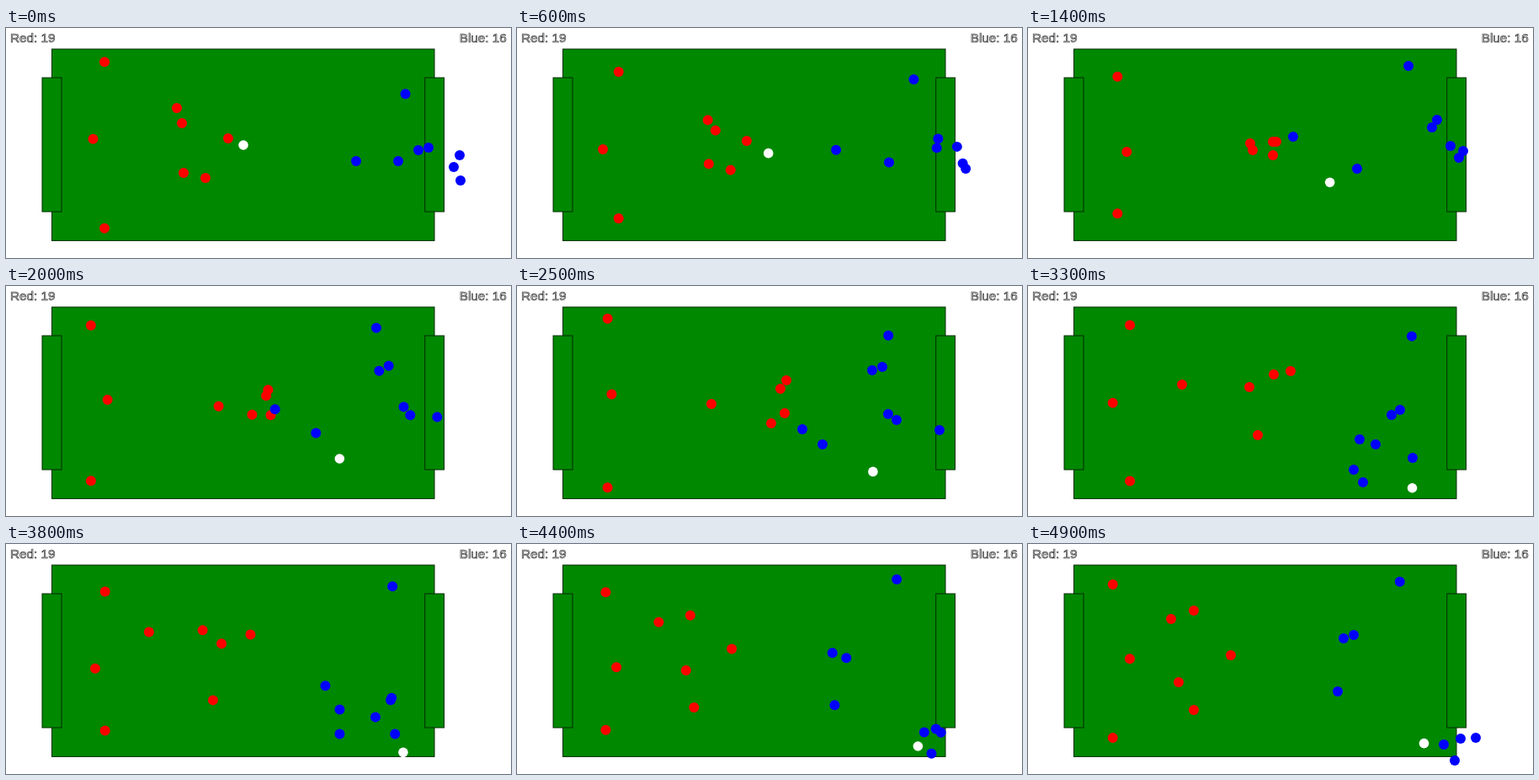
Write an HTML page that moves like this. It is 600x273 px and loops after 5000 ms.

```html
<!DOCTYPE html>
<html lang="en">
<head>
<meta charset="utf-8">
<title>Red and blue football</title>
<style>
  html, body { margin: 0; width: 100%; height: 100%; overflow: hidden; background: #fff; }
  svg { display: block; width: 100%; height: 100%; }
  rect { fill: #080; stroke: #022b02; stroke-width: 1; }
  text {
    font: 15.3px "Liberation Sans", Arial, sans-serif;
    fill: #ddd; stroke: #3a3a3a; stroke-width: .7;
  }
</style>
</head>
<body>
<svg viewBox="0 0 600 273">
  <rect x="54.5" y="25" width="454.5" height="227.4"/>
  <rect x="43" y="59" width="23" height="159"/>
  <rect x="497.7" y="59" width="22.8" height="159"/>
  <text x="5" y="17.3">Red: 19</text>
  <text x="538.7" y="17.3">Blue: 16</text>
  <g id="dots"></g>
</svg>
<script>
const LOOP = 5000, STEP = 100;
const BEATS = [0, 1.4, 2.5, 3.3, 4.9];
const RED = '#f00', BLUE = '#00f', WHITE = '#fff';
const layer = document.getElementById('dots');
const movers = [];

function addDot(color, place, r = 6) {
  const el = document.createElementNS('http://www.w3.org/2000/svg', 'circle');
  el.setAttribute('r', r);
  el.setAttribute('fill', color);
  layer.append(el);
  movers.push({ el, place });
}

// Smooth curve through one value per beat, at rest at both ends.
function curve(v) {
  const last = BEATS.length - 1;
  const span = i => BEATS[i + 1] - BEATS[i];
  const rate = i => (v[i + 1] - v[i]) / span(i);
  const slope = i => {
    if (i === 0 || i === last) return 0;
    const a = span(i - 1), b = span(i);
    return (rate(i - 1) * b + rate(i) * a) / (a + b);
  };
  return t => {
    let i = 0;
    while (i < last - 1 && t >= BEATS[i + 1]) i++;
    const h = span(i), u = (t - BEATS[i]) / h, w = 1 - u;
    return w * w * ((1 + 2 * u) * v[i] + u * h * slope(i))
         + u * u * ((1 + 2 * w) * v[i + 1] - w * h * slope(i + 1));
  };
}

function addRunner(color, ...points) {
  const x = curve(points.map(p => p[0])), y = curve(points.map(p => p[1]));
  addDot(color, t => [x(t), y(t)]);
}

function orbit(cx, cy, degrees) {
  const a = degrees * Math.PI / 180;
  return [cx + 10.3 * Math.cos(a), cy + 10.3 * Math.sin(a)];
}

// Red guards circle their posts, each mirroring the first.
const turn = t => 122 * t - 54;
addDot(RED, t => orbit(111, 48.6, turn(t)));
addDot(RED, t => orbit(111, 229.4, -turn(t)));
addDot(RED, t => orbit(111, 138.8, 169 - turn(t)));

// The blue guard spirals in to its post.
addDot(BLUE, t => {
  const away = Math.max(0, 1 - t / 2.5) ** 2;
  return orbit(449 + 21 * away, 52 + 17 * away, 424 - 114 * t);
});

addRunner(RED, [203, 95], [264, 137], [231, 140], [183, 117], [170, 89]);
addRunner(RED, [209, 113], [291, 135], [313, 122], [292, 105], [179, 164]);
addRunner(RED, [264, 131], [295, 135], [320, 112], [312, 101], [241, 132]);
addRunner(RED, [211, 172], [267, 145], [302, 163], [273, 177], [197, 197]);
addRunner(RED, [237, 178], [291, 151], [318, 151], [263, 120], [197, 79]);

addRunner(BLUE, [416, 158], [315, 129], [339, 170], [387, 218], [387, 108]);
addRunner(BLUE, [466, 158], [391, 167], [363, 188], [398, 233], [368, 175]);
addRunner(BLUE, [490, 145], [502, 140], [441, 152], [394, 182], [375, 112]);
addRunner(BLUE, [502, 142], [486, 109], [434, 96], [442, 147], [494, 238]);
addRunner(BLUE, [539, 151], [480, 118], [422, 100], [432, 153], [514, 231]);
addRunner(BLUE, [532, 165], [512, 154], [451, 159], [413, 188], [532, 230]);
addRunner(BLUE, [540, 181], [517, 146], [502, 171], [457, 204], [507, 257]);

// The ball is kicked, slows down, then rebounds off the line and a defender.
const bounce = (v, wall) => v > wall ? 2 * wall - v : v;
addDot(WHITE, t => {
  const s = Math.max(0, t - .4), rolled = 98.5 * s - 10 * s * s;
  return [bounce(282 + .866 * rolled, 480.5), bounce(139 + .5 * rolled, 248)];
}, 5.8);

function draw(now) {
  const t = Math.floor(now % LOOP / STEP) * STEP / 1000;
  for (const { el, place } of movers) {
    const [x, y] = place(t);
    el.setAttribute('cx', x.toFixed(2));
    el.setAttribute('cy', y.toFixed(2));
  }
}

function tick() {
  draw(performance.now());
  requestAnimationFrame(tick);
}
tick();
</script>
</body>
</html>
```
